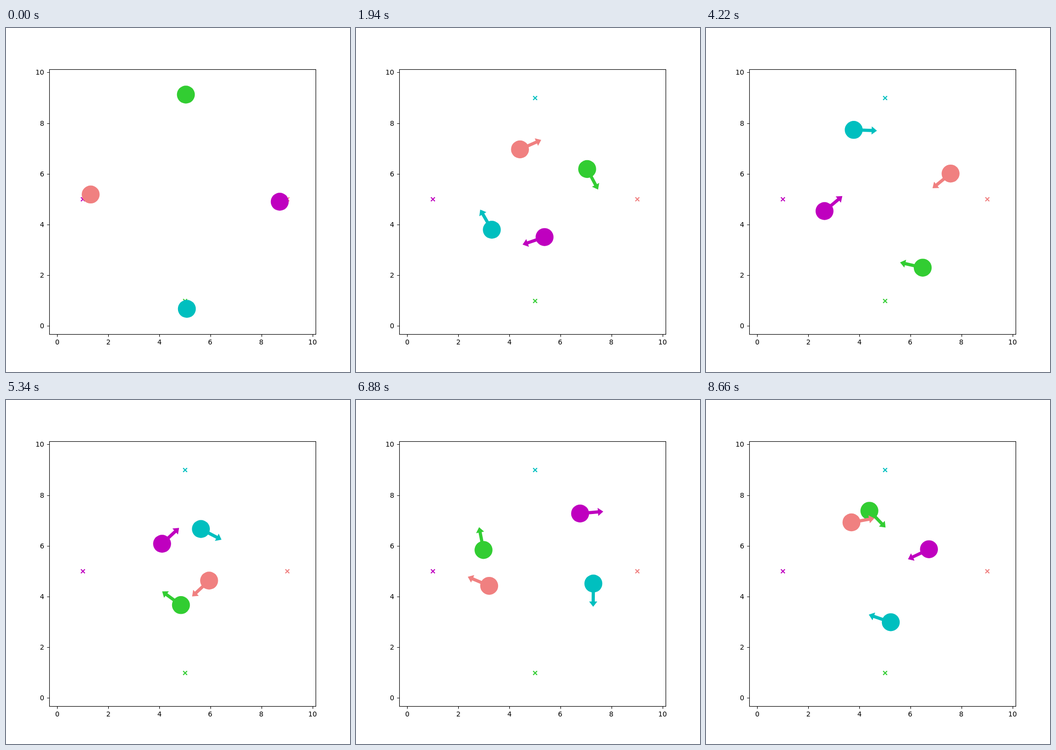
Write an HTML page that moves like this. It is 700 px wide and 700 px high and loops after 8760 ms.

```html
<!DOCTYPE html>
<html lang="en">
<head>
<meta charset="utf-8">
<title>Four agents</title>
<style>
  html, body { margin: 0; width: 100%; height: 100%; overflow: hidden; background: #fff; }
  svg { display: block; width: 700px; height: 700px; }
  text { font: 13.89px "DejaVu Sans", sans-serif; fill: #000; }
  .axis { fill: none; stroke: #000; stroke-width: 1.11; }
  .goal { fill: none; stroke-width: 2.08; }
</style>
</head>
<body>
<svg id="stage" viewBox="0 0 700 700"></svg>
<script>
const LOOP = 8760, SPEED = 4.65, RADIUS = 18.25, DIGIT = 8.84;
const stage = document.getElementById('stage');

function add(tag, attrs, text) {
  const el = document.createElementNS('http://www.w3.org/2000/svg', tag);
  for (const k in attrs) el.setAttribute(k, attrs[k]);
  if (text !== undefined) el.textContent = text;
  stage.appendChild(el);
  return el;
}

const px = x => 104.3 + 51.93 * x;
const py = y => 606.3 - 51.59 * y;
const snap = v => Math.floor(v + 0.5) + 0.5;

function drawAxes() {
  add('rect', { class: 'axis', x: 88.5, y: 84.5, width: 542, height: 539 });
  for (let v = 0; v <= 10; v += 2) {
    const x = px(v), y = py(v), width = DIGIT * String(v).length;
    add('path', { class: 'axis', d: `M${snap(x)} 623.5v4.9M88.5 ${snap(y)}h-4.9` });
    add('text', { x: Math.round(x - width / 2), y: 644 }, v);
    add('text', { x: Math.round(77.8 - width), y: Math.floor(y + 5.5) }, v);
  }
}

// Steps at which every agent passes its next waypoint [x, y, heading];
// headings are in degrees, clockwise from right.
const STEPS = [0, 41, 64, 91, 115, 148, 185];
const LAST = STEPS[STEPS.length - 1];
const agents = [
  { color: '#32cd32', goal: [5, 1], path: [
    [366, 135.5, 74], [470.4, 287, 62], [486.2, 391.2, 86], [441, 487.7, 193],
    [356, 417.3, 216], [259.5, 305.2, 259], [332.5, 225.4, 46]] },
  { color: '#00bfbf', goal: [5, 9], path: [
    [368, 571.5, 254], [276.4, 410.5, 240], [253.2, 308, 267.5], [300.6, 207.3, 2],
    [396.6, 262.5, 27.5], [483, 373.5, 90.5], [376, 452.2, 199]] },
  { color: '#bf00bf', goal: [1, 5], path: [
    [557, 353.5, 168], [383.7, 425.4, 161], [279.2, 444, 179], [241.2, 372.5, 320],
    [317.6, 292.5, 317], [456, 231, 355], [453.7, 303.7, 154.5]] },
  { color: '#f08080', goal: [9, 5], path: [
    [172.3, 338.8, 344], [333.7, 247, 336], [438.3, 229, 1], [497.7, 296.2, 141],
    [413.3, 367.5, 137], [271, 378.2, 203], [296, 249, 350]] }
];

// Samples a cubic curve whose two handles have the given length.
function curve([xa, ya, ha], [xb, yb, hb], handle) {
  const a = ha * Math.PI / 180, b = hb * Math.PI / 180, points = [];
  const xs = [xa, xa + handle * Math.cos(a), xb - handle * Math.cos(b), xb];
  const ys = [ya, ya + handle * Math.sin(a), yb - handle * Math.sin(b), yb];
  const at = (p, t, u) => p[0] * u ** 3 + 3 * p[1] * u * u * t + 3 * p[2] * u * t * t + p[3] * t ** 3;
  const slope = (p, t, u) =>
    (p[1] - p[0]) * u * u + 2 * (p[2] - p[1]) * u * t + (p[3] - p[2]) * t * t;
  let length = 0;
  for (let i = 0; i <= 200; i++) {
    const t = i / 200, u = 1 - t, x = at(xs, t, u), y = at(ys, t, u);
    if (i) length += Math.hypot(x - points[i - 1].x, y - points[i - 1].y);
    points.push({ x, y, length, angle: Math.atan2(slope(ys, t, u), slope(xs, t, u)) * 180 / Math.PI });
  }
  return { points, length };
}

// Picks the handle that makes the curve as long as a steady speed needs,
// then spaces the steps evenly along it.
function leg(from, to, steps) {
  const want = SPEED * steps;
  let low = 0.1 * want, high = 0.65 * want;
  for (let i = 0; i < 20; i++) {
    const mid = (low + high) / 2;
    if (curve(from, to, mid).length < want) low = mid; else high = mid;
  }
  const { points, length } = curve(from, to, low);
  return Array.from({ length: steps }, (_, i) =>
    points.find(p => p.length >= length * i / steps));
}

function track(path) {
  const poses = STEPS.slice(1).flatMap((step, i) => leg(path[i], path[i + 1], step - STEPS[i]));
  const [x, y, angle] = path[path.length - 1];
  return [...poses, { x, y, angle }];
}

drawAxes();
for (const a of agents) {
  const x = snap(px(a.goal[0])), y = snap(py(a.goal[1]));
  add('path', { class: 'goal', stroke: a.color, d: `M${x - 4} ${y - 4}l8 8m0 -8l-8 8` });
}
for (const a of agents) {
  a.track = track(a.path);
  a.disc = add('circle', { r: RADIUS, fill: a.color });
  a.arrow = add('path', { fill: a.color, d: 'M0 -3.25H36.5V-8.3L47.3 0L36.5 8.3V3.25H0Z' });
}

// Steps are held for 20, 100 and 20 ms in turn.
function stepAt(ms) {
  const rest = ms % 140;
  const n = 3 * Math.floor(ms / 140) + (rest < 20 ? 0 : rest < 120 ? 1 : 2);
  return Math.min(n, LAST);
}

function render(ms) {
  const n = stepAt(ms);
  for (const a of agents) {
    const { x, y, angle } = a.track[n];
    a.disc.setAttribute('cx', x);
    a.disc.setAttribute('cy', y);
    a.arrow.setAttribute('transform', `translate(${x} ${y}) rotate(${angle})`);
    a.arrow.setAttribute('visibility', n ? 'visible' : 'hidden');
  }
}

const start = performance.now();
function tick() {
  render((performance.now() - start) % LOOP);
  requestAnimationFrame(tick);
}
render(0);
requestAnimationFrame(tick);
</script>
</body>
</html>
```
